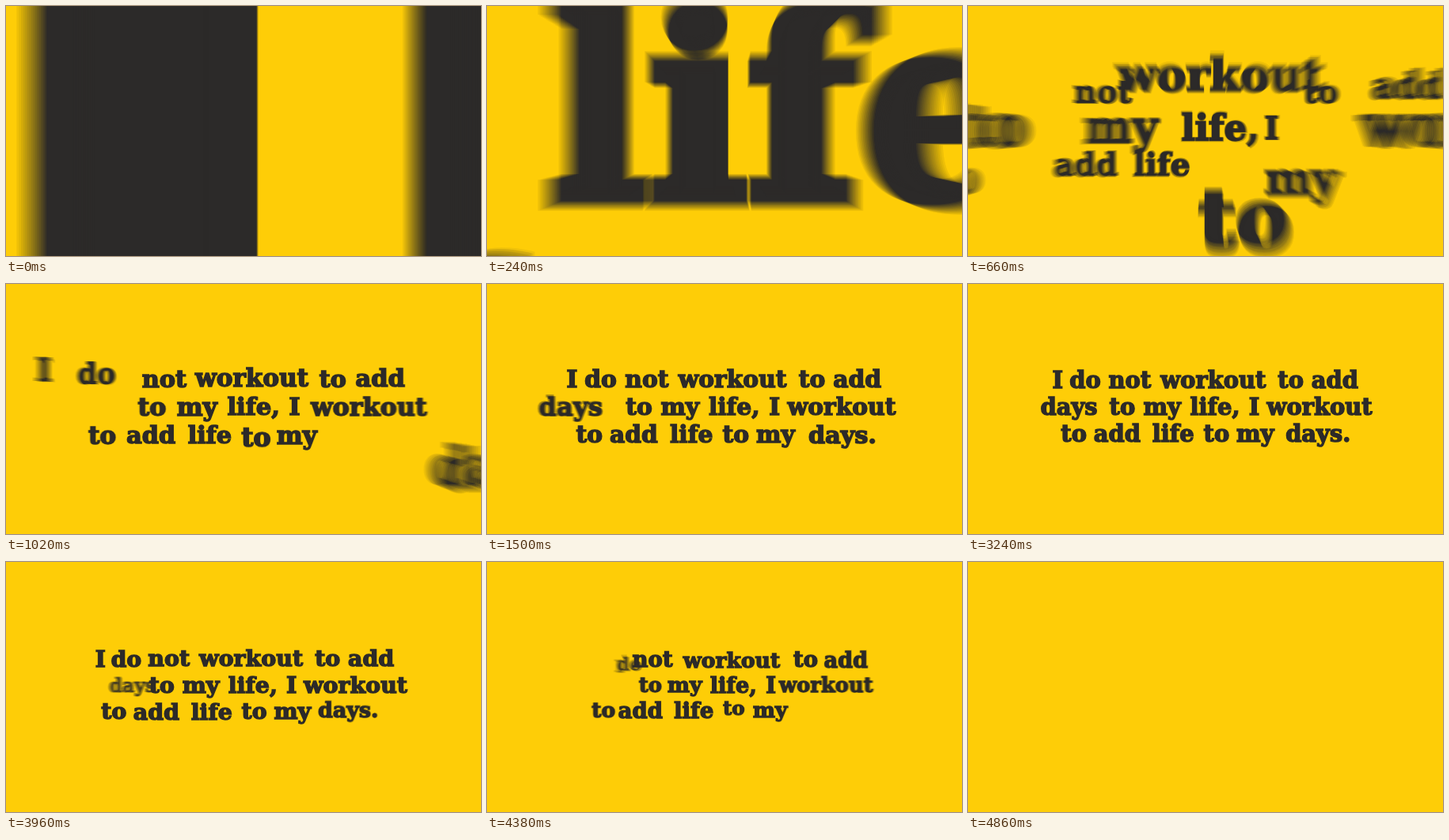
An HTML page with a canvas that plays this animation: 600x317 px, repeating every 5280 ms.

```html
<!DOCTYPE html>
<html lang="en">
<head>
<meta charset="utf-8">
<title>Workout quote</title>
<style>
html, body { margin: 0; width: 100%; height: 100%; overflow: hidden; background: #fecd07; }
canvas { display: block; width: 600px; height: 317px; }
</style>
</head>
<body>
<canvas id="stage" width="600" height="317"></canvas>
<script>
const W = 600, H = 317, CX = 300, CY = 158.5;
const LOOP = 5280, STEP = 60, SHUTTER = 26, SAMPLES = 16;
const SIZE = 29.3, LAST = 647;
const BG = '#fecd07', INK = '#2c2a29';

// word, left edge, arrival delay in ms
const lines = [
  [131.6, [['I', 104, 300], ['do', 126, 240], ['not', 176, -60],
           ['workout', 242.5, 60], ['to', 392.5, -60], ['add', 435.5, 0]]],
  [166.1, [['days', 88.5, LAST], ['to', 177, 120], ['my', 220.5, 60],
           ['life,', 280.3, 0], ['I', 355.5, -60], ['workout', 378.5, 120]]],
  [200.6, [['to', 115, 60], ['add', 157, -60], ['life', 232, -60],
           ['to', 297.5, 180], ['my', 339.5, 60], ['days.', 402.5, 467]]]
];
const words = lines.flatMap(([y, row]) =>
  row.map(([text, x, delay]) => ({ text, x, y, delay })));

const ctx = document.getElementById('stage').getContext('2d');
const layer = document.createElement('canvas');
layer.width = W;
layer.height = H;
const pen = layer.getContext('2d');
pen.font = `bold ${SIZE}px "DejaVu Serif", "Noto Serif", serif`;
pen.fontKerning = 'none';
pen.lineWidth = 1.5;
pen.lineJoin = 'miter';
pen.miterLimit = 3;
for (const w of words) w.width = pen.measureText(w.text).width;

// Excess scale while a word rushes in from the camera
const arrive = t => Math.exp(3.71 - 0.00587 * t - 0.0028 * Math.max(0, t - 480));
// Lost scale while it falls back; the order of arrival is reversed
const leave = t => 0.18 * Math.exp((t - 3960) / 165);

function drawWord(w, t) {
  const out = t - LAST + w.delay;
  const alpha = Math.min(1, (4150 - out) / 240);
  if (alpha <= 0) return;
  const drift = 1 + 0.0148 * (2.4 - t / 1000);
  const s = drift * (1 + arrive(t - w.delay)) * (1 - leave(out));
  if (s <= 0) return;
  const x = CX + s * (w.x - CX), y = CY + s * (w.y - CY);
  if (x > W + s || x + (w.width + 1) * s < 0 || y - SIZE * s > H || y + 9 * s < 0) return;
  pen.setTransform(s, 0, 0, s, x, y);
  pen.globalAlpha = alpha;
  pen.fillText(w.text, 0, 0);
  pen.strokeText(w.text, 0, 0);
}

function drawScene(t) {
  pen.setTransform(1, 0, 0, 1, 0, 0);
  pen.globalAlpha = 1;
  pen.fillStyle = BG;
  pen.fillRect(0, 0, W, H);
  pen.fillStyle = pen.strokeStyle = INK;
  for (const w of words) drawWord(w, t);
}

// Motion blur: running average over the open shutter
function render(t) {
  for (let i = 0; i < SAMPLES; i++) {
    drawScene(t + SHUTTER * ((i + 0.5) / SAMPLES - 0.5));
    ctx.globalAlpha = 1 / (i + 1);
    ctx.drawImage(layer, 0, 0);
  }
}

const start = performance.now();
let shown = -1;
function tick() {
  const t = (performance.now() - start) % LOOP;
  const now = Math.min(Math.floor(t / STEP) * STEP, 4860);
  if (now !== shown) {
    shown = now;
    if (now < 4860) render(now);
    else {
      ctx.globalAlpha = 1;
      ctx.fillStyle = BG;
      ctx.fillRect(0, 0, W, H);
    }
  }
  requestAnimationFrame(tick);
}
tick();
</script>
</body>
</html>
```
